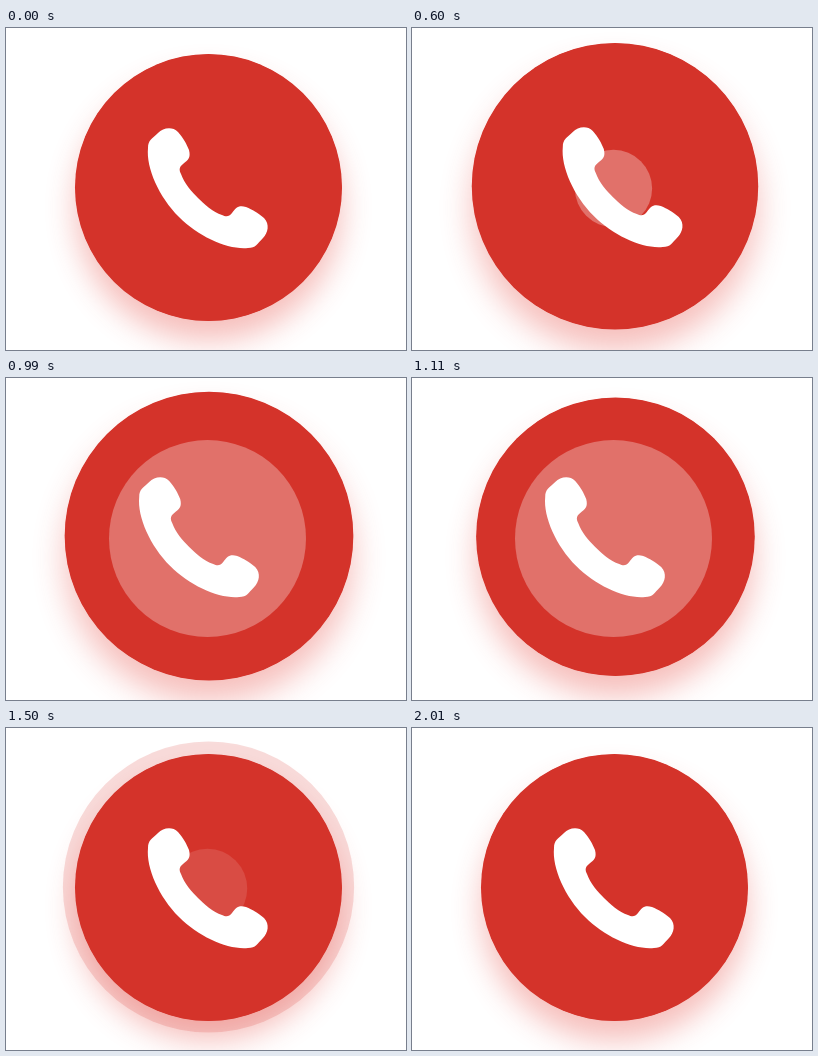
An HTML page with a canvas for the animation above (2.4 s loop, 400 px wide and 322 px high).

```html
<!DOCTYPE html>
<html lang="en">
<head>
<meta charset="utf-8">
<title>Ringing call button</title>
<style>
  html, body { margin: 0; width: 100%; height: 100%; overflow: hidden; background: #fff; }
  canvas { display: block; }
</style>
</head>
<body>
<canvas id="stage" width="400" height="322"></canvas>
<script>
const ctx = document.getElementById('stage').getContext('2d');
const LOOP = 2400;
const RED = '#d4332a';
const RADIUS = 133.5;
const PEAK_RADIUS = 150.7;

// Handset outline, symmetric about the diagonal x + y = 362.
const handset = new Path2D(`M142 120
  C142 112 146 111 152 105 C157 100 166 98 172 104
  C178 111 180 115 183 122 C185 130 182 132 177 136
  C173 139 173 142 175 146 C178 155 186 164 192 170
  C198 176 207 184 216 187 C220 189 223 189 226 185
  C230 180 232 177 240 179 C247 182 251 184 258 190
  C264 196 262 205 257 210 C251 216 250 220 242 220
  C222 222 193 209 173 189 C153 169 140 140 142 120Z`);

const progress = (t, start, end) => Math.min(1, Math.max(0, (t - start) / (end - start)));
const mix = (a, b, k) => a + (b - a) * k;

function disc(x, y, r, color, alpha = 1) {
  ctx.globalAlpha = alpha;
  ctx.fillStyle = color;
  ctx.beginPath();
  ctx.arc(x, y, r, 0, Math.PI * 2);
  ctx.fill();
  ctx.globalAlpha = 1;
}

function buttonAt(t) {
  if (t < 290 || t >= 1275) return { x: 202.5, y: 159.5, r: RADIUS };
  const r = t < 840
    ? mix(RADIUS, PEAK_RADIUS, progress(t, 290, 840))
    : mix(PEAK_RADIUS, 133, progress(t, 840, 1260));
  return {
    x: mix(203, 204, progress(t, 990, 1260)),
    y: 159.5 - (r - RADIUS) * 0.13,
    r
  };
}

function drawShadow({ x, y, r }) {
  const scale = r / RADIUS;
  ctx.save();
  ctx.shadowColor = 'rgba(228, 58, 48, 0.33)';
  ctx.shadowBlur = 30 * scale;
  ctx.shadowOffsetY = 20 * scale;
  disc(x, y, r - 0.5, RED);
  ctx.restore();
}

function drawRing(t) {
  if (t < 1226 || t >= 1726) return;
  const k = progress(t, 1226, 1726);
  const settle = progress(t, 1260, 1500);
  disc(mix(201.5, 202.5, settle), mix(160.5, 159, settle),
       mix(RADIUS, 155.5, k), RED, 0.38 * (1 - k));
}

function drawPulse(t) {
  const fade = 1 - progress(t, 1204, 1702);
  const r = 98.5 * progress(t, 350, 990) * fade;
  if (r > 0) disc(201.5, 160.5, r, '#fff', 0.3 * fade);
}

function drawHandset(t) {
  const shaking = t >= 210 && t < 1260;
  const side = Math.floor((t - 210) / 75) % 2 ? 1 : -1;
  ctx.save();
  if (shaking) ctx.translate(side * 8.8, -1);
  ctx.fillStyle = '#fff';
  ctx.fill(handset);
  ctx.restore();
}

function draw(t) {
  const button = buttonAt(t);
  ctx.fillStyle = '#fff';
  ctx.fillRect(0, 0, 400, 322);
  drawShadow(button);
  drawRing(t);
  disc(button.x, button.y, button.r, RED);
  drawPulse(t);
  drawHandset(t);
}

const start = performance.now();
function tick() {
  draw((performance.now() - start) % LOOP);
  requestAnimationFrame(tick);
}
tick();
</script>
</body>
</html>
```
